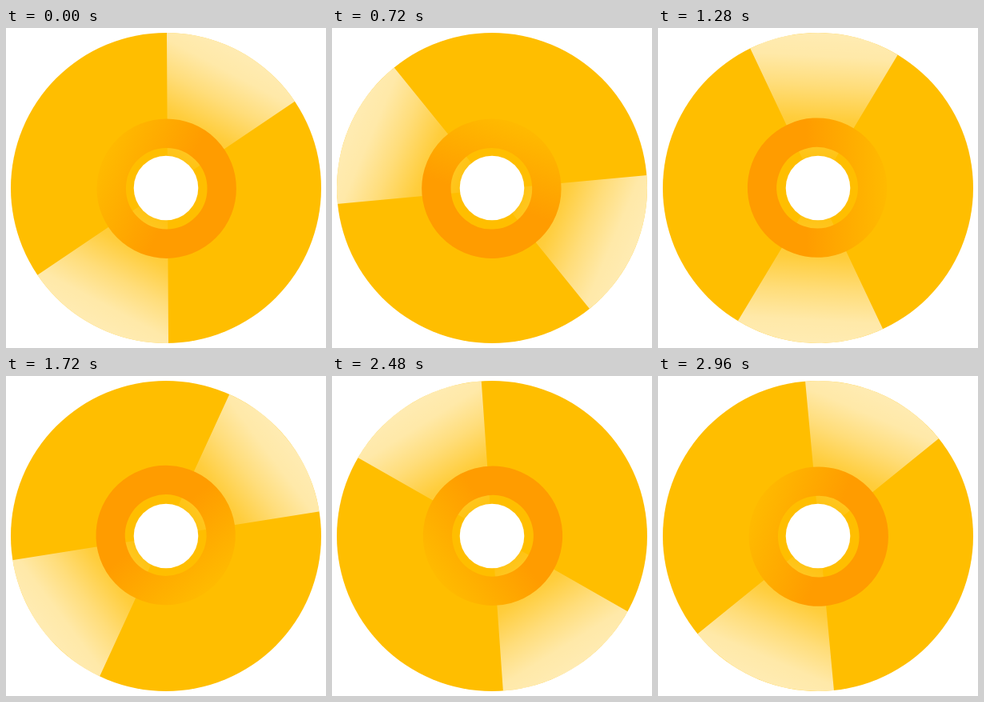
Write an HTML page that moves like this. It is 400x400 px and loops after 3 s.

```html
<!DOCTYPE html>
<html lang="en">
<head>
<meta charset="utf-8">
<title>Spinning disc</title>
<style>
html, body { margin: 0; width: 100%; height: 100%; overflow: hidden; background: #fff; }
svg { display: block; width: 100%; height: 100%; }
</style>
</head>
<body>
<svg viewBox="0 0 400 400">
  <defs>
    <!-- Runs outward from the centre and mirrors to the opposite side -->
    <linearGradient id="shine" gradientUnits="userSpaceOnUse" spreadMethod="reflect"
      x1="200" y1="200" x2="291.1" y2="28.7">
      <stop offset=".15" stop-color="#fff" stop-opacity=".05"/>
      <stop offset=".45" stop-color="#fff" stop-opacity=".24"/>
      <stop offset=".66" stop-color="#fff" stop-opacity=".48"/>
      <stop offset=".85" stop-color="#fff" stop-opacity=".66"/>
      <stop offset="1" stop-color="#fff" stop-opacity=".7"/>
    </linearGradient>
    <linearGradient id="ringFill" gradientUnits="userSpaceOnUse"
      x1="122" y1="164" x2="280" y2="237">
      <stop offset="0" stop-color="#ffba00"/>
      <stop offset=".58" stop-color="#ff9c00"/>
    </linearGradient>
    <clipPath id="rim"><circle cx="200" cy="200" r="194"/></clipPath>
  </defs>
  <circle cx="200" cy="200" r="194" fill="#ffbe00"/>
  <g id="disc">
    <g clip-path="url(#rim)">
      <path d="M200.4-101L450.7 31.2L-46.7 366.8L203.6 499Z" fill="url(#shine)"/>
    </g>
    <circle cx="200.7" cy="200.7" r="69" fill="none" stroke="url(#ringFill)" stroke-width="36.4"/>
  </g>
  <circle cx="200" cy="200" r="40.3" fill="#fff"/>
</svg>
<script>
const LOOP = 3000, TICK = 40, STEPS = 72;
const disc = document.getElementById('disc');
const start = performance.now();

function draw() {
  const time = (performance.now() - start) % LOOP;
  // 72 poses spread over 75 ticks, so three poses are held twice as long
  const step = Math.round(Math.floor(time / TICK) * STEPS * TICK / LOOP);
  disc.setAttribute('transform', `rotate(${step * 360 / STEPS} 200 200)`);
  requestAnimationFrame(draw);
}
draw();
</script>
</body>
</html>
```
